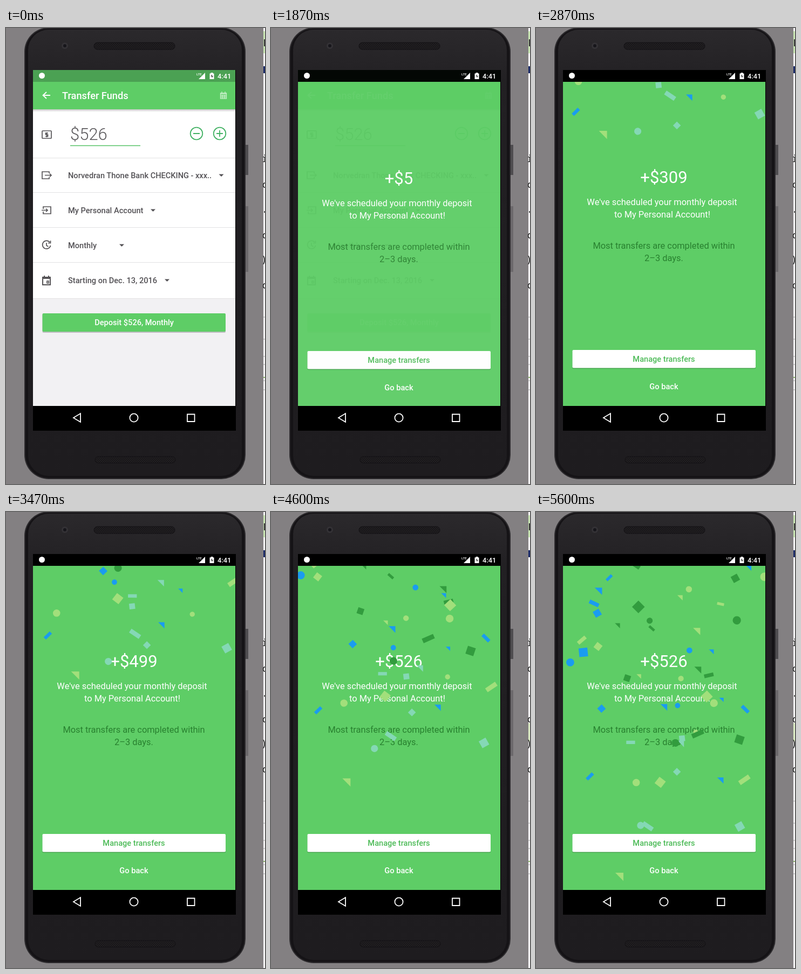
An HTML page that plays this animation: 480 px wide and 847 px high, repeating every 5.67 s.

```html
<!DOCTYPE html>
<html lang="en">
<head>
<meta charset="utf-8">
<title>Transfer Funds</title>
<style>
html, body { margin: 0; width: 100%; height: 100%; overflow: hidden; background: #838082; }
svg { display: block; width: 100%; height: 100%; font-family: Roboto, "Open Sans", sans-serif; font-size: 14.6px; }
.mid { text-anchor: middle; }
.med { font-weight: 500; }
.big { font-size: 31px; }
.msg { font-size: 16.4px; }
.icon { fill: none; stroke: #555356; stroke-width: 1.7; }
.page { font: 18px "DejaVu Sans Mono", monospace; }
</style>
</head>
<body>
<svg viewBox="0 0 480 847">
  <defs>
    <linearGradient id="face" x2="0" y2="1">
      <stop offset="0" stop-color="#2b292c"/><stop offset=".12" stop-color="#222023"/><stop offset="1" stop-color="#1e1c1f"/>
    </linearGradient>
    <linearGradient id="shade" x2="0" y2="1">
      <stop offset="0" stop-color="#000" stop-opacity=".22"/><stop offset="1" stop-color="#000" stop-opacity="0"/>
    </linearGradient>
    <pattern id="mesh" width="4" height="4" patternUnits="userSpaceOnUse">
      <rect width="4" height="4" fill="#171517"/><circle cx="1" cy="1" r=".8" fill="#302e31"/><circle cx="3" cy="3" r=".8" fill="#302e31"/>
    </pattern>
    <clipPath id="pageClip"><path d="M476 0h4v847h-4z"/></clipPath>
    <clipPath id="viewClip"><path d="M50 100h375v602H50z"/></clipPath>
    <clipPath id="buttonClip"><rect x="67.500" y="530" width="339.500" height="34" rx="2"/></clipPath>
  </defs>

  <rect width="480" height="847" fill="#838082"/>
  <g class="page" fill="#222" clip-path="url(#pageClip)">
    <path d="M477 0h3v847h-3z" fill="#f4f3f4"/>
    <path d="M477 6h3v41h-3z" fill="#c9e5b3"/>
    <path d="M478 21h2v13h-2z" fill="#333"/>
    <path d="M477 71h3v13h-3z" fill="#1c2c68"/>
    <path id="mark" d="M477 392h3v34h-3z" fill="#dcecc4"/>
    <text x="474" y="249">i</text><text x="474" y="297">c</text><text x="474" y="343">.</text>
    <text x="474" y="391">c</text><text x="473" y="437">)</text><text x="474" y="484">c</text>
    <path d="M477 537h3m-3 41h3m-3 32h3m-3 15h3m-3 30h3m-3 17h3" stroke="#aaa"/>
    <path d="M477 649h3" stroke="#8fb66d" stroke-width="2"/>
  </g>

  <path d="M444 217h5v56h-5z" fill="#4f4d50"/>
  <path d="M444 331h5v122h-5z" fill="#6c696c"/>
  <rect x="34" y="-1" width="410" height="839" rx="45" fill="#2c2a2d"/>
  <rect x="36" y="1" width="406" height="835" rx="43" fill="#151316"/>
  <rect x="41" y="3" width="396" height="829" rx="38" fill="url(#face)"/>
  <rect x="163" y="27" width="150" height="13" rx="6.5" fill="url(#mesh)" stroke="#131114"/>
  <rect x="165" y="796" width="149" height="12" rx="6" fill="url(#mesh)" stroke="#131114"/>
  <circle cx="109" cy="33" r="6" fill="#343236"/><circle cx="109" cy="33" r="3" fill="#17161b"/>
  <path d="M50 78h376v670H50z"/>

  <g id="form">
    <path d="M50 78h375v22H50z" fill="#4ba153"/>
    <path d="M50 100h375v602H50z" fill="#f2f1f3"/>
    <path d="M50 151h375v351H50z" fill="#fff"/>
    <path d="M50 100h375v51H50z" fill="#5ecd66"/>
    <path d="M50 151h375v5H50z" fill="url(#shade)"/>
    <path d="M50 241.5h375M50 305.5h375M50 370.5h375M50 435.5h375M50 502.5h375" stroke="#e2e1e3"/>
    <path d="M82 125H69m6-6-6.500 6 6.500 6" fill="none" stroke="#fff" stroke-width="1.8"/>
    <text class="med" x="104" y="132" fill="#fff" font-size="18.2">Transfer Funds</text>
    <path d="M397.500 121h11v10h-11zM397 122h12M400 118v3m6-3v3M398 125h10M398 128h10M401 124v7m4-7v7" fill="none" stroke="#c5eec7" stroke-width="1.3"/>
    <text class="big" x="119" y="207.500" fill="#59575a" font-weight="300">$526</text>
    <path d="M119 218.500h130" stroke="#55c166" stroke-width="1.5"/>
    <g fill="none" stroke="#43b264" stroke-width="1.8">
      <circle cx="353" cy="196" r="11.300"/><circle cx="396" cy="196" r="11.300"/>
      <path d="M347 196h12M390 196h12M396 190v12"/>
    </g>
    <g class="icon">
      <rect x="67" y="191" width="17" height="14" rx="1"/>
      <path d="M78 195h-4.500v3h4v3.500H73M75.500 194v9"/>
      <path d="M80 270v-3H67v13h13v-3M72 273.500h12m-3-3 3 3-3 3"/>
      <path d="M69 336v-4h14v13H69v-4M66 338.500h11m-3-3 3 3-3 3"/>
      <path d="M81 398a7.500 7.500 0 1 0 1.500 6M82.500 395v4.500H78M75 399v5l3.500 2"/>
      <path d="M68 463h14v14H68zM68 465h14M71 460v3m8-3v3" stroke-width="2"/>
      <path d="M76 470h3v4h-3z"/>
    </g>
    <g class="med" fill="#535155">
      <text x="115" y="278.500">Norvedran Thone Bank CHECKING - xxx..</text>
      <text x="115" y="344">My Personal Account</text>
      <text x="115" y="409">Monthly</text>
      <text x="115" y="474">Starting on Dec. 13, 2016</text>
      <path d="M394.500 271.500h9l-4.500 4.500zM268 336.500h9l-4.500 4.500zM210 401.500h9l-4.500 4.500zM294 466.500h9l-4.500 4.500z"/>
    </g>
    <rect x="67.500" y="531" width="339.500" height="35" rx="2" fill="#bdbcbe"/>
    <rect x="67.500" y="530" width="339.500" height="34" rx="2" fill="#5ecd66"/>
    <circle id="ripple" cx="237" cy="547" fill="#fff" opacity="0" clip-path="url(#buttonClip)"/>
    <text class="mid med" x="237.500" y="552" fill="#fff">Deposit $526, Monthly</text>
  </g>

  <g id="done" clip-path="url(#viewClip)">
    <path d="M50 100h375v602H50z" fill="#5ecd66"/>
    <text id="amount" class="mid big" x="237" y="288" fill="#fff"></text>
    <g class="mid msg" fill="#fff">
      <text x="233.500" y="328.500">We've scheduled your monthly deposit</text>
      <text x="234" y="351.500">to My Personal Account!</text>
    </g>
    <g class="mid msg" fill="#28802f">
      <text x="237" y="410">Most transfers are completed within</text>
      <text x="237" y="433">2–3 days.</text>
    </g>
    <rect x="67.500" y="599" width="339.500" height="34" rx="2" fill="#45a34d"/>
    <rect x="67.500" y="598" width="339.500" height="33.500" rx="2" fill="#fff"/>
    <text class="mid med" x="237" y="620" fill="#4dbb58">Manage transfers</text>
    <text class="mid med" x="237" y="671" fill="#fff">Go back</text>
    <g id="confetti"></g>
  </g>

  <path id="bar" d="M50 78h375v22H50z"/>
  <g fill="#fff">
    <circle cx="66.500" cy="88.500" r="5.500"/>
    <text class="med" x="353" y="88" font-size="6">LTE</text>
    <path d="M369 83v12h-12z"/>
    <path d="M379.500 83h4v1.500h2V95h-8V84.500h2z"/>
    <path d="M382 86l-2.500 4h2v3l2.500-4h-2z" fill="#444"/>
    <text class="med" x="392" y="93.500" font-size="12.8">4:41</text>
  </g>

  <path d="M50 702h376v46H50z"/>
  <g fill="none" stroke="#fff" stroke-width="1.8">
    <path d="M138 716v16l-13-8zM336 717.500h13.500V731H336z"/><circle cx="237" cy="724" r="7.600"/>
  </g>
</svg>
<script>
const LOOP = 5670, FPS = 15;
const COUNT = 52, EARLY = 16;
const COLOURS = ['#84d8b5', '#a2df7b', '#1a9cf0', '#329c3e'];
const $ = id => document.getElementById(id);
const clamp = x => Math.min(1, Math.max(0, x));
const ease = x => (1 - Math.cos(Math.PI * clamp(x))) / 2;
const frac = x => x - Math.floor(x);

let seed = 7;
const rand = () => (seed = seed * 16807 % 2147483647) / 2147483647;
const spread = range => (rand() * 2 - 1) * range;

const box = (w, h) => `M${-w / 2} ${-h / 2}h${w}v${h}h${-w}z`;

// Nearer pieces are larger and fall faster, so speed sets the size.
const SHAPES = [
  v => box(v * .093, v * .093),
  v => { const r = v * .046; return `M${-r} 0a${r} ${r} 0 1 0 ${2 * r} 0a${r} ${r} 0 1 0 ${-2 * r} 0z`; },
  v => { const s = v * .086; return `M${-s / 2} ${-s / 2}h${s}v${s}z`; },
  v => box(v * .128, v * .05)
];
const CORNER = 2;

function makePiece(i) {
  const kind = i % SHAPES.length;
  const speed = 95 + 85 * frac(.18 + i * .382);
  const el = document.createElementNS('http://www.w3.org/2000/svg', 'path');
  el.setAttribute('d', SHAPES[kind](speed));
  // The palette shifts by one colour after the first wave.
  el.setAttribute('fill', COLOURS[Math.floor(3 * frac(i * .29)) + (i < EARLY ? 0 : 1)]);
  $('confetti').append(el);
  return {
    el, speed,
    born: 2.05 + .11 * i ** .88,
    x: 50 + 375 * frac(.563 - .172 * i + spread(i / 24)),
    drift: spread(Math.min(i * 3, 25)),
    curve: spread(Math.min(i * 2, 8)),
    angle: kind === CORNER ? 0 : 45 * Math.cos(i)
  };
}
const pieces = Array.from({ length: COUNT }, (_, i) => makePiece(i));

function draw(ms) {
  const press = clamp((ms - 1440) / 260);
  $('ripple').setAttribute('r', 20 + 160 * press);
  $('ripple').setAttribute('opacity', ms < 1440 ? 0 : .22);

  const enter = ease((ms - 1650) / 250);
  $('done').setAttribute('opacity', enter);
  $('done').setAttribute('transform', `translate(0 ${48 * (1 - enter)})`);
  $('bar').setAttribute('opacity', enter);
  $('amount').textContent = '+$' + Math.round(526 * ease((ms - 1748) / 2012));
  $('mark').setAttribute('opacity', ms < 4200 ? 0 : 1);

  for (const p of pieces) {
    const age = Math.max(0, ms / 1000 - p.born);
    const x = p.x + p.drift * age + p.curve * age * age;
    const y = 91 + p.speed * age;
    p.el.setAttribute('transform', `translate(${x} ${y}) rotate(${p.angle})`);
    p.el.setAttribute('visibility', age > 0 ? 'visible' : 'hidden');
  }
}

const start = performance.now();
function tick() {
  const ms = (performance.now() - start) % LOOP;
  draw(Math.floor((ms + 10) * FPS / 1000) * 1000 / FPS);
  requestAnimationFrame(tick);
}
tick();
</script>
</body>
</html>
```
